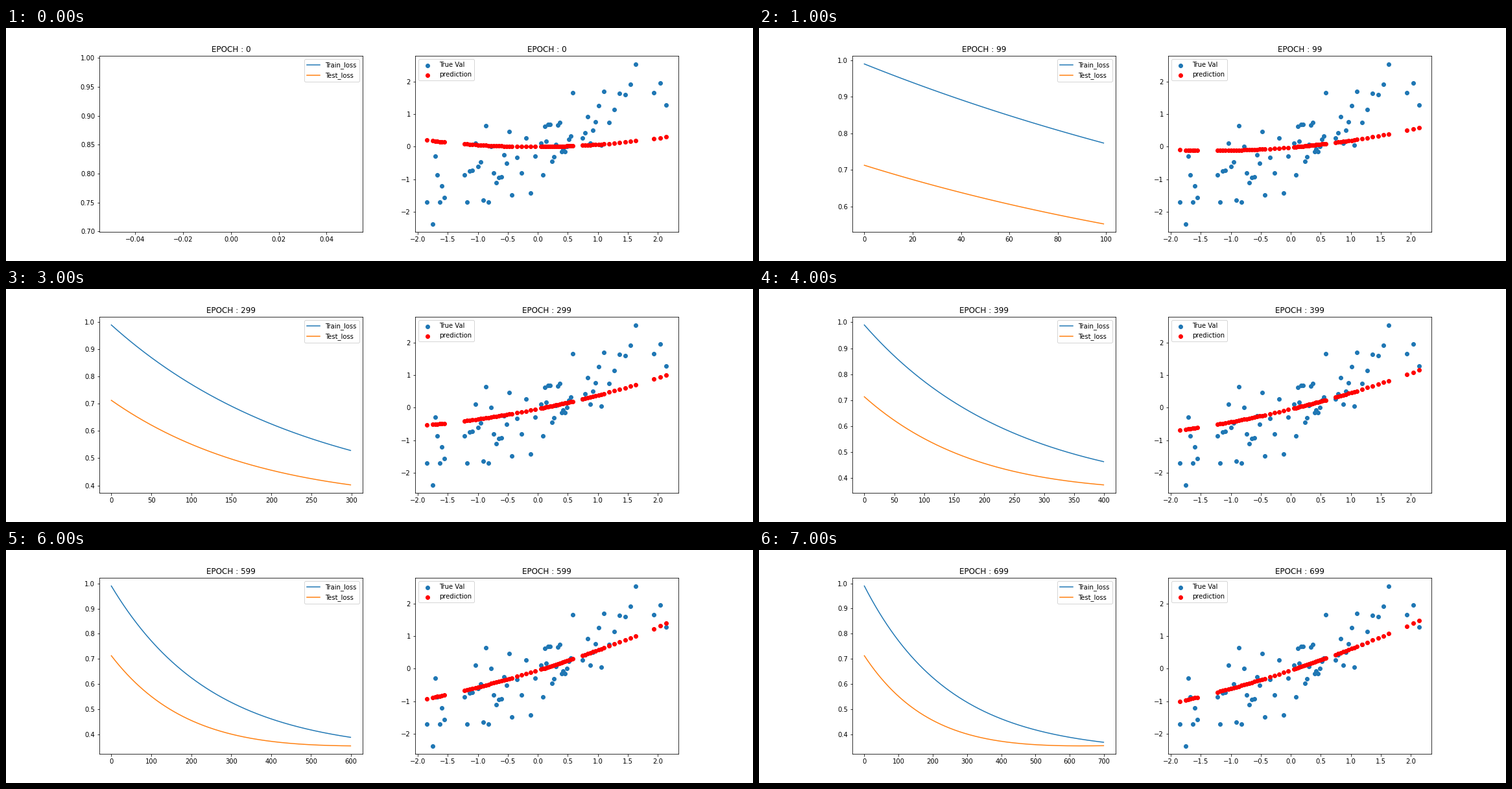
A matplotlib script that plays this animation: 1152 px wide and 360 px high, repeating every 8000 ms.

```python
import matplotlib.pyplot as plt
import numpy as np
from matplotlib.animation import FuncAnimation

FRAMES = 8
STEP = 100  # epochs between two frames
SAMPLES = 67


def decay(epoch, tau):
    return np.exp(-epoch / tau)


def train_loss(epoch):
    return 0.3287 + 0.6611 * decay(epoch, 250)


def test_loss(epoch):
    return 0.3547 + 0.6541 * (decay(epoch, 470) - 0.26) ** 2


def predict(x, epoch):
    """Quadratic model whose weights relax towards their optimum."""
    bias = -0.052 * (1 - decay(epoch, 250))
    slope = 0.8 - 0.793 * decay(epoch, 490)
    curve = 0.046 + 0.0163 * decay(epoch, 400)
    return bias + slope * x + curve * x ** 2


def make_samples():
    """Clustered x values with noisy y values around the fully trained curve."""
    ranks = [0, 1, 6, 7, 25, 30, 31, 48, 49, 57, 63, 64, 66]
    knots = [-1.845, -1.75, -1.56, -1.22, -0.43, -0.04, 0.05,
             0.58, 0.74, 1.10, 1.63, 1.93, 2.1416]
    x = np.interp(np.arange(SAMPLES), ranks, knots)
    rng = np.random.default_rng(4)
    y = predict(x, np.inf) + rng.normal(0, 0.6, SAMPLES)
    y = np.clip(y, -1.7, 2.35)
    y[1], y[63] = -2.375, 2.545  # extremes set the axis limits
    return x, y


X, Y = make_samples()

plt.rcParams["font.family"] = "DejaVu Sans"
fig, (loss_ax, fit_ax) = plt.subplots(1, 2, figsize=(16, 5), dpi=72)
fig.subplots_adjust(left=0.125, right=0.9, bottom=0.125, top=0.88, wspace=0.2)


def draw(frame):
    epoch = max(0, frame * STEP - 1)
    epochs = np.arange(epoch + 1)
    for ax in (loss_ax, fit_ax):
        ax.clear()
        ax.set_title(f"EPOCH : {epoch}")

    loss_ax.plot(epochs, train_loss(epochs), label="Train_loss")
    loss_ax.plot(epochs, test_loss(epochs), label="Test_loss")
    loss_ax.legend(loc="upper right")

    fit_ax.scatter(X, Y, label="True Val")
    fit_ax.scatter(X, predict(X, epoch), color="red", label="prediction")
    fit_ax.legend(loc="upper left")


anim = FuncAnimation(fig, draw, frames=FRAMES, interval=1000, repeat=True)
plt.show()
```
